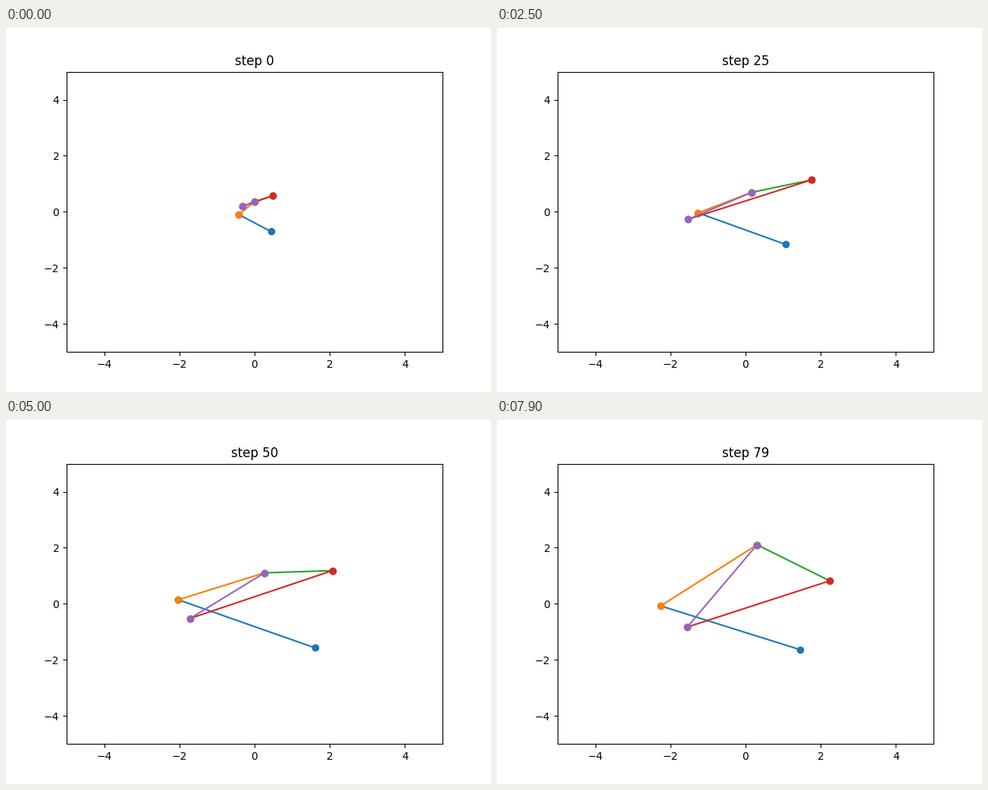
A matplotlib script that plays this animation: 640 by 480 pixels, repeating every 8000 ms.

```python
import numpy as np
import matplotlib.pyplot as plt
from matplotlib.animation import FuncAnimation
from matplotlib.transforms import Affine2D

WIDTH, HEIGHT, DPI = 640, 480, 100
STEPS = 80
EDGES = ["ab", "bc", "cd", "de", "ec"]


def path(start, drift, bend, turn, new_drift, new_bend):
    """Parabolic motion that takes on a new drift and bend at the turn."""
    start, drift, bend, new_drift, new_bend = map(
        np.array, (start, drift, bend, new_drift, new_bend))

    def at(step):
        t = min(step, turn)
        s = step - t
        return (start + drift * t + bend * t ** 2
                + new_drift * s + new_bend * s ** 2)

    return at


# Stage pixels, y down. An edge that reaches full length turns both its ends.
AB_FULL, DE_FULL = 47, 29
NODES = {
    "a": path((349.7, 268.45), (1.25, 0.68), (0, 0),
              AB_FULL, (-0.23, 0.01), (-0.0006, 0.0022)),
    "b": path((307.3, 246), (-1.675, 0.05), (0, -0.0055),
              AB_FULL, (-0.45, 0.28), (0.0018, 0)),
    "c": path((327.9, 229), (0.39, -0.49), (-0.0025, 0),
              DE_FULL, (0.245, -0.36), (-0.0025, -0.0129)),
    "d": path((351.8, 221.2), (2.51, -0.98), (0, 0.006),
              DE_FULL, (0.29, -0.14), (0, 0.0085)),
    "e": path((312.2, 235.2), (-2.25, 0.54), (-0.0057, 0.0055),
              DE_FULL, (-0.07, 0.25), (0.005, 0.002)),
}

fig, ax = plt.subplots(figsize=(WIDTH / DPI, HEIGHT / DPI), dpi=DPI)
ax.set(xlim=(-5, 5), ylim=(-5, 5))
title = ax.set_title("step 0")
stage = Affine2D().scale(1, -1).translate(0, HEIGHT)
lines = [ax.plot([], [], "o-", transform=stage)[0] for _ in EDGES]


def update(step):
    for line, (start, end) in zip(lines, EDGES):
        line.set_data(*zip(NODES[start](step), NODES[end](step)))
    title.set_text(f"step {step}")
    return [*lines, title]


anim = FuncAnimation(fig, update, frames=STEPS, interval=100,
                     repeat=True, repeat_delay=0, blit=False)
plt.show()
```
